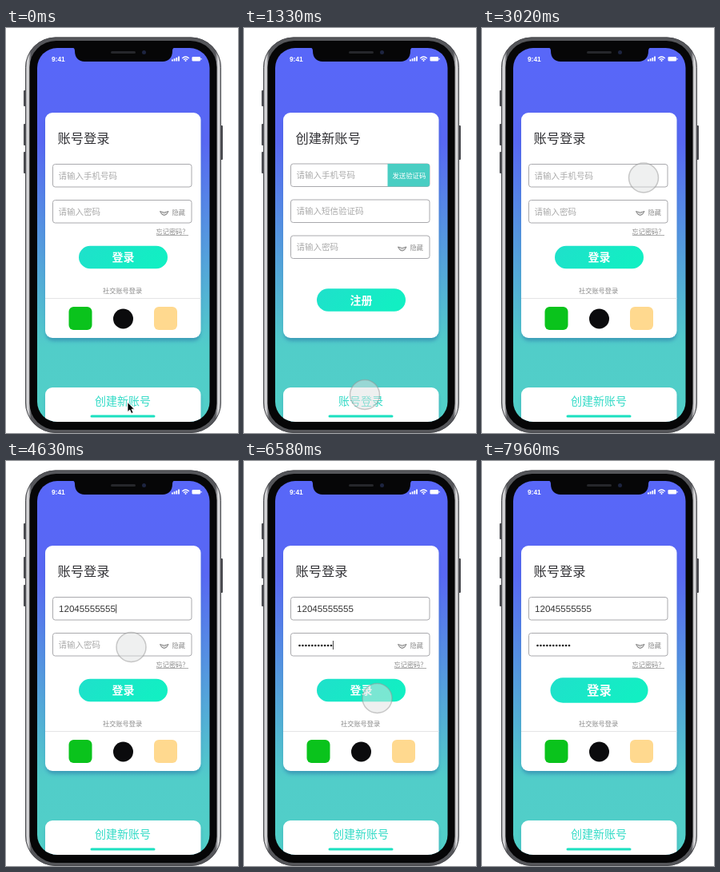
An HTML page that plays this animation: 290x507 px, repeating every 8 s.

```html
<!DOCTYPE html>
<html lang="zh-CN">
<head>
<meta charset="utf-8">
<title>账号登录</title>
<style>
html, body { margin: 0; width: 100%; height: 100%; overflow: hidden; background: #fff; }
svg { display: block; width: 100%; height: 100%; }
text { font-family: "Noto Sans CJK SC", "Noto Sans CJK", sans-serif; }
.latin { font-family: "Liberation Sans", sans-serif; }
.title { font-size: 16.3px; font-weight: 500; }
.hint { font-size: 10.5px; fill: #aaa; }
.small { font-size: 8.2px; fill: #8c8c8c; }
.field { fill: #fff; stroke: #a9a9ad; }
.big { font-size: 14px; font-weight: 700; fill: #fff; text-anchor: middle; }
</style>
</head>
<body>
<svg id="stage" viewBox="0 0 290 507" preserveAspectRatio="none">
  <defs>
    <linearGradient id="sky" gradientUnits="userSpaceOnUse" x1="0" y1="25" x2="0" y2="493">
      <stop offset=".05" stop-color="#5867f8"/>
      <stop offset=".25" stop-color="#5867f3"/>
      <stop offset=".8" stop-color="#51cdc9"/>
      <stop offset="1" stop-color="#51cfc8"/>
    </linearGradient>
    <linearGradient id="mint" x1="0" y1="0" x2="1" y2=".25">
      <stop offset="0" stop-color="#1fe0cb"/>
      <stop offset="1" stop-color="#12efc3"/>
    </linearGradient>
    <linearGradient id="steel" x1="0" x2="1" y1="0" y2="0">
      <stop offset="0" stop-color="#8d8d90"/>
      <stop offset=".014" stop-color="#e2e2e4"/>
      <stop offset=".03" stop-color="#55565a"/>
      <stop offset=".97" stop-color="#55565a"/>
      <stop offset=".986" stop-color="#e2e2e4"/>
      <stop offset="1" stop-color="#8d8d90"/>
    </linearGradient>
    <filter id="soft" x="-10%" y="-10%" width="120%" height="120%">
      <feGaussianBlur stdDeviation="2"/>
    </filter>
    <clipPath id="screen"><rect x="39" y="25" width="215.5" height="468" rx="25"/></clipPath>
  </defs>

  <g fill="#4b4c50">
    <rect x="22" y="78" width="3" height="20" rx="1"/>
    <rect x="22" y="120" width="3" height="27" rx="1"/>
    <rect x="22" y="155" width="3" height="27" rx="1"/>
    <rect x="268" y="122" width="3" height="43" rx="1"/>
  </g>
  <rect x="24" y="11.5" width="245" height="495.5" rx="38" fill="url(#steel)"/>
  <rect x="24.5" y="12" width="244" height="494.5" rx="37.5" fill="none" stroke="#4a4b4f"/>
  <rect x="29.5" y="16" width="234" height="487" rx="33" fill="#060607"/>

  <g clip-path="url(#screen)">
    <rect x="38" y="24" width="218" height="470" fill="url(#sky)"/>
    <g id="deck"></g>
    <rect x="105.500" y="484.500" width="81" height="3" rx="1.500" fill="#1be0c0"/>
    <path d="M80 24H214C209 24 208 26 208 29C208 37 203 42 196 42H98C91 42 86 37 86 29C86 26 85 24 80 24Z" fill="#060607"/>
  </g>
  <rect x="131" y="29" width="31" height="3" rx="1.500" fill="#26272b"/>
  <circle cx="172.500" cy="30.500" r="2.500" fill="#1d2440"/>

  <g fill="#fff">
    <text class="latin" x="57" y="41.800" font-size="8.300" font-weight="700">9:41</text>
    <path d="M207 41.500v-2h1.800v2zM209.700 41.500v-3.200h1.800v3.200zM212.400 41.500v-4.600h1.800v4.600zM215.100 41.500v-6h1.800v6z"/>
    <g fill="none" stroke="#fff" stroke-width="1.300">
      <path d="M220.200 38Q224.500 34 228.800 38M222 39.800Q224.500 37.500 227 39.800"/>
    </g>
    <circle cx="224.500" cy="41" r="1"/>
    <rect x="232.500" y="36" width="10.500" height="5.500" rx="1.300"/>
    <rect x="243.500" y="37.700" width="1" height="2" rx=".5"/>
  </g>

  <circle id="touch" r="18.500" fill="#dfe2e2" fill-opacity=".5" stroke="#969696" stroke-opacity=".5" stroke-width="1.500"/>
  <path id="arrow" d="M152 468.500V480.500L154.800 478L156.800 482.500L159 481.500L157 477.200H160.500Z" fill="#000" stroke="#fff" stroke-width=".8"/>
</svg>

<script>
const LOOP = 8000;
const DROP = 344;              // distance between the main and the docked card
const PHONE = "12045555555";
const $ = id => document.getElementById(id);

const clamp = v => Math.max(0, Math.min(1, v));
const mix = (a, b, p) => a + (b - a) * p;
const span = (t, a, b) => clamp((t - a) / (b - a));
const smooth = p => p * p * (3 - 2 * p);
const settle = p => 1 - (1 - p) ** 4;

// Text placed by the middle of its line
const label = (cls, x, mid, size, str, extra = "") =>
  `<text class="${cls}" x="${x}" y="${mid + size * .37}" ${extra}>${str}</text>`;

const field = (y, hint, id = "") =>
  `<rect class="field" x="58.5" y="${y}" width="173.5" height="28.500" rx="3"/>` +
  label("hint", 65.5, y + 14.5, 10.5, hint, id && `id="${id}"`);

const eye = y =>
  `<path d="M192.500 ${y - 1}Q197.700 ${y + 2} 203 ${y - 1}Q201 ${y + 4} 197.700 ${y + 4}Q194.500 ${y + 4} 192.500 ${y - 1}Z"
    fill="#ddd" stroke="#777" stroke-width=".9"/>` + label("small", 207.5, y, 8.2, "隐藏");

const button = (id, mid, str) =>
  `<g id="${id}"><rect x="91" y="${mid - 14.25}" width="111" height="28.500" rx="14.250" fill="url(#mint)"/>` +
  label("big", 146.5, mid, 14, str) + `</g>`;

const card = (id, title, body) =>
  `<g id="${id}">
    <rect x="50" y="110" width="193" height="282" rx="9" fill="#1f5f9c" opacity=".4" filter="url(#soft)"/>
    <rect x="49" y="106" width="194.500" height="282" rx="9" fill="#fff"/>
    <g class="body">${body}</g>
    <text class="title">${title}</text>
  </g>`;

const loginBody =
  field(170.5, "请输入手机号码", "phoneHint") +
  `<text id="phone" class="latin" x="66" y="189" font-size="11.600" fill="#333"></text>` +
  field(215.5, "请输入密码", "passHint") +
  `<g id="dots" fill="#222"></g>` + eye(230.5) +
  `<rect id="caret" width=".9" height="11" fill="#333"/>` +
  label("small", 187.5, 255, 8.2, "忘记密码？") +
  `<path d="M188 259.500H228" stroke="#999" stroke-width=".8"/>` +
  button("login", 287, "登录") +
  label("small", 121, 329, 8.2, "社交账号登录") +
  `<path d="M49 338.500H243.500" stroke="#e4e4e6"/>
   <rect x="78.500" y="349" width="29" height="29" rx="6" fill="#0ac31c"/>
   <circle cx="146.500" cy="364" r="12.500" fill="#0b0b0d"/>
   <rect x="185" y="349" width="29" height="29" rx="6" fill="#ffd98f"/>`;

const joinBody =
  field(170, "请输入手机号码") +
  `<path d="M179.500 170H229Q232 170 232 173V195.500Q232 198.500 229 198.500H179.500Z" fill="#49cec3"/>` +
  label("small", 185.5, 184.5, 8.4, "发送验证码", `style="fill:#fff;font-size:8.4px"`) +
  field(215, "请输入短信验证码") +
  field(260, "请输入密码") + eye(275) +
  button("join", 340.5, "注册");

$("deck").innerHTML = card("joinCard", "创建新账号", joinBody) + card("loginCard", "账号登录", loginBody);
$("dots").innerHTML = Array.from(PHONE, (_, i) =>
  `<circle cx="${69.5 + i * 3.95}" cy="231" r="1.350"/>`).join("");

// down: 0 = main position, 1 = docked at the bottom
function placeCard(node, down) {
  const title = node.querySelector(".title");
  const docked = 146 - title.textContent.length * 7;
  const scale = mix(1, 14 / 16.3, down);
  const x = mix(64.5, docked, down), y = mix(144, 127.5, down);
  const ink = [[50, 52], [50, 219], [54, 199]].map(([a, b]) => Math.round(mix(a, b, down)));
  node.setAttribute("transform", `translate(0 ${down * DROP})`);
  title.setAttribute("transform", `translate(${x} ${y}) scale(${scale})`);
  title.setAttribute("fill", `rgb(${ink})`);
  title.setAttribute("font-weight", down > .5 ? 400 : 500);
  title.style.fontWeight = down > .5 ? 400 : 500;
  node.querySelector(".body").setAttribute("opacity", 1 - smooth(down));
}

// Each visit of the touch point: rows of time, x, y
const visits = [
  [[80, 151, 471], [350, 151, 471]],
  [[860, 306, 400], [1320, 151, 459], [1420, 151, 459], [1500, 151, 467], [1680, 151, 467]],
  [[2600, 306, 370], [3010, 202, 187.5], [3110, 202, 187.5], [3280, 193, 184], [3460, 193, 184], [3900, 312, 370]],
  [[4360, 265, 365], [4620, 156.5, 233], [4720, 156.5, 233], [4800, 151, 230], [4980, 151, 230], [5500, 246, 365], [5790, 236, 365]],
  [[6230, 246, 365], [6570, 166.5, 297], [6665, 166.5, 297], [7000, 158, 291], [7150, 158, 291], [7600, 246, 365], [7800, 246, 365]]
];

function touchAt(t) {
  const path = visits.find(v => t >= v[0][0] && t < v[v.length - 1][0]);
  if (!path) return null;
  const i = path.findIndex(k => k[0] > t);
  const [t0, x0, y0] = path[i - 1], [t1, x1, y1] = path[i];
  const p = smooth(span(t, t0, t1));
  return [mix(x0, x1, p), mix(y0, y1, p)];
}

const show = (node, on) => node.setAttribute("visibility", on ? "inherit" : "hidden");
const typed = (t, start, end) => t < start ? 0 : Math.min(11, 1 + Math.floor((t - start) / (end - start) * 10 + 1e-6));

function draw(t) {
  const away = t < 1000 ? settle(span(t, 210, 630)) : 1 - settle(span(t, 1640, 2080));
  const front = t < 1000 ? $("joinCard") : $("loginCard");
  if ($("deck").lastElementChild !== front) $("deck").append(front);
  placeCard($("loginCard"), away);
  placeCard($("joinCard"), 1 - away);

  const digits = typed(t, 3460, 4190), stars = typed(t, 4980, 5790);
  $("phone").textContent = PHONE.slice(0, digits);
  show($("phoneHint"), !digits);
  show($("passHint"), !stars);
  [...$("dots").children].forEach((dot, i) => show(dot, i < stars));

  const caret = $("caret");
  show(caret, t >= 3460 && t < 7090);
  caret.setAttribute("x", stars ? 67.5 + stars * 3.95 : 66.3 + digits * 6.45);
  caret.setAttribute("y", stars ? 225 : 179.5);

  const pop = t < 7880 ? mix(1, 1.24, smooth(span(t, 7640, 7880)))
                       : mix(1.24, 1.1, smooth(span(t, 7880, 7958)));
  $("login").setAttribute("transform", `translate(146.5 287) scale(${pop}) translate(-146.5 -287)`);

  const at = touchAt(t);
  show($("touch"), at);
  if (at) $("touch").setAttribute("transform", `translate(${at})`);
  show($("arrow"), t < 80);
}

const begin = performance.now();
function tick() {
  draw((performance.now() - begin) % LOOP);
  requestAnimationFrame(tick);
}
draw(0);
requestAnimationFrame(tick);
</script>
</body>
</html>
```
